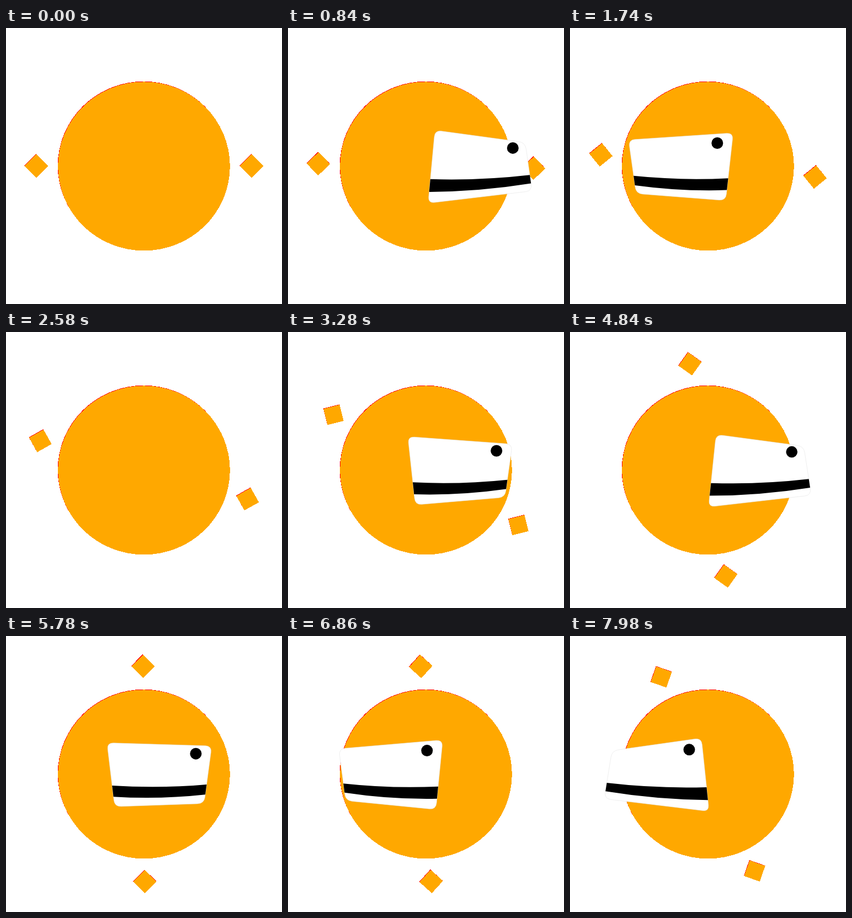
Write an HTML page that moves like this. It is 500 by 500 pixels and loops after 8000 ms.

```html
<!DOCTYPE html>
<html lang="en">
<head>
<meta charset="utf-8">
<title>Orbiting card</title>
<style>
  html, body { margin: 0; width: 100%; height: 100%; overflow: hidden; background: #fff; }
  svg { display: block; width: 100vw; height: 100vh; }
</style>
</head>
<body>
<svg viewBox="0 0 500 500">
  <defs>
    <rect id="square" x="-15" y="-15" width="30" height="30"/>
    <ellipse id="disc" cx="250" cy="250.4" rx="155.8" ry="153"/>
  </defs>
  <g shape-rendering="crispEdges">
    <g id="rim" fill="red" transform="translate(-.5 -.7)"></g>
    <g id="body" fill="#ffa800"></g>
  </g>
  <g id="front">
    <path id="face" fill="#fff" stroke="#e2e2e2" stroke-width=".6"/>
    <path id="stripe"/>
    <circle id="mark"/>
  </g>
</svg>
<script>
const LOOP = 8000, SWING = 6110, TURN = 1290, FRONT = 570;
const CX = 254, CY = 251.3, RADIUS = 97, HALF = 88;
const $ = id => document.getElementById(id);

// cubic-bezier(x1, 0, x2, 1)
function ease(x, x1, x2) {
  let lo = 0, hi = 1, s = .5;
  for (let i = 0; i < 30; i++) {
    s = (lo + hi) / 2;
    const v = 1 - s;
    if (3 * v * v * s * x1 + 3 * v * s * s * x2 + s ** 3 < x) lo = s; else hi = s;
  }
  return s * s * (3 - 2 * s);
}

const mix = (p, q, u) => [p[0] + (q[0] - p[0]) * u, p[1] + (q[1] - p[1]) * u];
const fmt = p => p[0].toFixed(2) + ' ' + p[1].toFixed(2);

function roundPath(pts, r) {
  return pts.map((p, i) => {
    const near = q => mix(p, q, Math.min(.4, r / (Math.hypot(q[0] - p[0], q[1] - p[1]) || 1)));
    return (i ? 'L' : 'M') + fmt(near(pts[(i + 3) % 4])) + 'Q' + fmt(p) + ' ' + fmt(near(pts[(i + 1) % 4]));
  }).join('') + 'Z';
}

function add(parent, tag, attrs) {
  const el = document.createElementNS('http://www.w3.org/2000/svg', tag);
  for (const k in attrs) el.setAttribute(k, attrs[k]);
  return parent.appendChild(el);
}

const layers = [$('rim'), $('body')].map(g => {
  const squares = [180, 0].map(a => [a, add(g, 'use', { href: '#square' })]);
  add(g, 'use', { href: '#disc' });
  return { squares, back: add(g, 'path', {}) };
});

// The card circles the disc: its width flips sign when it turns its back,
// its outer edge shrinks with distance and its pitch changes at the sides.
function cardAt(t) {
  const phase = 2 * Math.PI * (t - FRONT) / TURN;
  const sin = Math.sin(phase), cos = Math.cos(phase);
  const width = Math.tanh(30 * (cos + .45));
  const lean = 7 * width * Math.tanh(6 * (.48 - cos));
  const point = (side, v) => [
    CX + RADIUS * sin + side * (HALF * width + lean * (2 * v - 1)),
    CY + (55 - side * 11.5 * sin) * (2 * v - 1)
  ];
  return { width, on: (u, v) => mix(point(-1, v), point(1, v), u) };
}

function draw(time) {
  const t = time % LOOP;
  const angle = 90 * ease(1 - Math.abs(1 - t / SWING), .74, .55);
  const { width, on } = cardAt(t);
  const outline = roundPath([on(0, 0), on(1, 0), on(1, 1), on(0, 1)], 12);
  const white = width > 0;

  for (const { squares, back } of layers) {
    for (const [start, el] of squares)
      el.setAttribute('transform', `rotate(${start + angle} 250 250) translate(445 250) rotate(45)`);
    back.setAttribute('d', white ? '' : outline);
  }

  $('front').style.display = white ? '' : 'none';
  if (!white) return;
  $('face').setAttribute('d', outline);
  $('stripe').setAttribute('d', 'M' + fmt(on(0, .67)) + 'Q' + fmt(on(.5, .73)) + ' ' + fmt(on(1, .67))
    + 'L' + fmt(on(1, .845)) + 'Q' + fmt(on(.5, .91)) + ' ' + fmt(on(0, .845)) + 'Z');
  const [x, y] = on(.855, .14);
  $('mark').setAttribute('cx', x);
  $('mark').setAttribute('cy', y);
  $('mark').setAttribute('r', 10.5 * width);
}

const begin = performance.now();
function tick() {
  draw(performance.now() - begin);
  requestAnimationFrame(tick);
}
tick();
</script>
</body>
</html>
```
